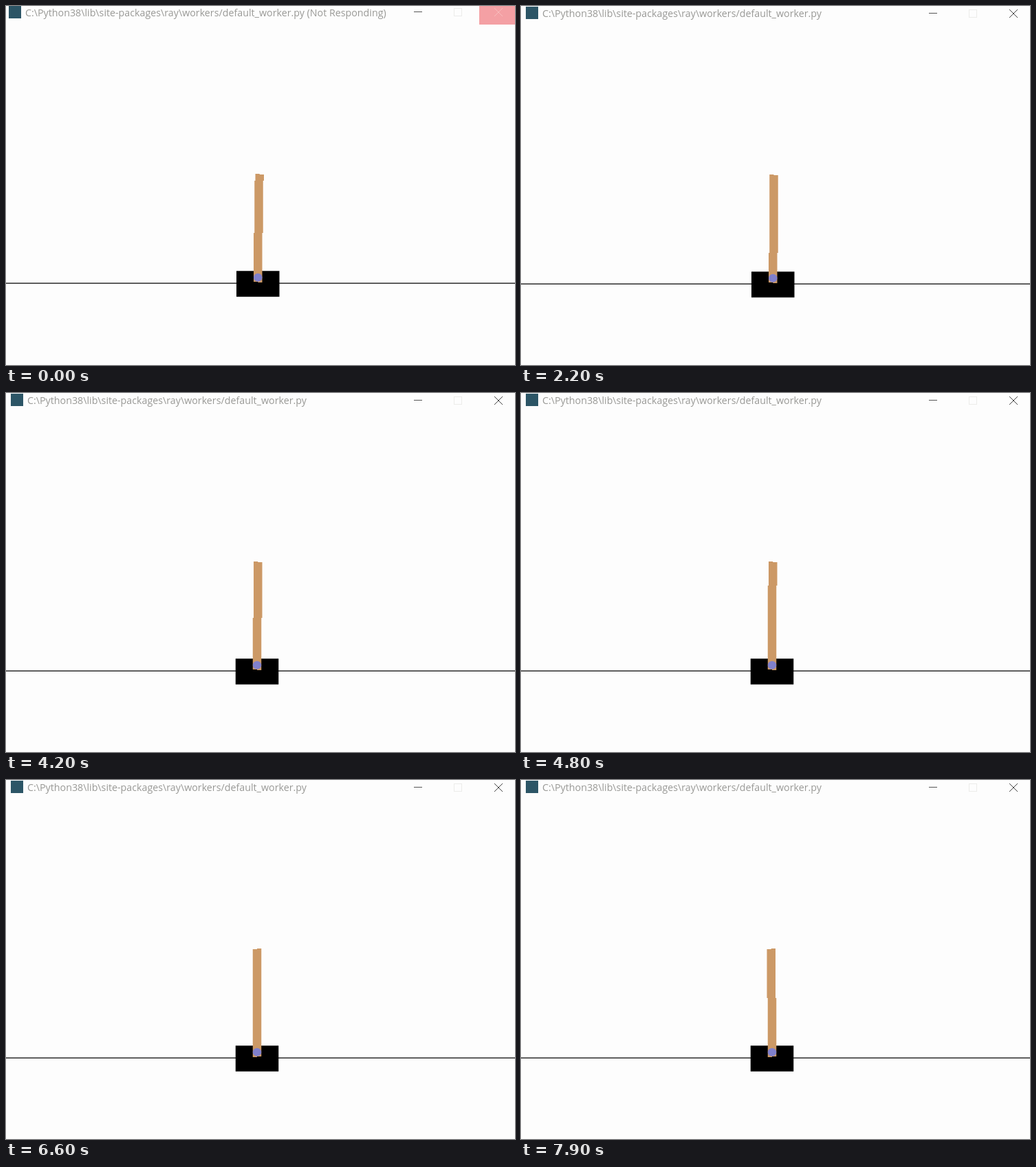
An HTML page with a canvas for the animation above (8 s loop, 740x522 px).

```html
<!DOCTYPE html>
<html lang="en">
<head>
<meta charset="utf-8">
<title>Cart pole</title>
<style>
  html, body { margin: 0; width: 100%; height: 100%; overflow: hidden; background: #fdfdfd; }
  canvas { display: block; }
</style>
</head>
<body>
<canvas id="stage" width="740" height="522"></canvas>
<script>
const ctx = document.getElementById('stage').getContext('2d');
const LOOP = 8000, STEP = 100, WAKE = 800;
const ORIGIN = 360, CELL = 1.25; // the scene is pixel art scaled up by CELL
const TITLE = 'C:\\Python38\\lib\\site-packages\\ray\\workers/default_worker.py';

// time, left edge of the pole at the axle in cells from ORIGIN, lean in cells per row
const KEYS = [
  [800, 1.15, 0.0132],
  [1300, 1.33, 0.010],
  [3000, 0.166, 0.006],
  [4200, -0.483, 0.007],
  [4800, -0.58, 0.005],
  [6600, -0.5, -0.003],
  [7900, -0.454, -0.007]
];

function pose(t) {
  if (t < WAKE) return { x: 0.145, lean: 1 / 76 };
  let i = 0;
  while (i < KEYS.length - 2 && t >= KEYS[i + 1][0]) i++;
  const [t0, x0, l0] = KEYS[i], [t1, x1, l1] = KEYS[i + 1];
  const k = Math.min(1, (t - t0) / (t1 - t0));
  return { x: x0 + (x1 - x0) * k, lean: l0 + (l1 - l0) * k };
}

const snap = x => ORIGIN + CELL * Math.floor(x);

function rect(x, y, w, h, color) {
  ctx.fillStyle = color;
  ctx.fillRect(x, y, w, h);
}

function cross(x, y, size, color) {
  ctx.strokeStyle = color;
  ctx.lineWidth = 1;
  ctx.beginPath();
  ctx.moveTo(x, y);
  ctx.lineTo(x + size, y + size);
  ctx.moveTo(x + size, y);
  ctx.lineTo(x, y + size);
  ctx.stroke();
}

function drawTitleBar(frozen) {
  const dx = frozen ? -3 : 0, dy = frozen ? -1 : 0;
  rect(7 + dx, 1 + dy, 18, 18, '#2c5566');
  ctx.font = '14.25px "Open Sans", "Noto Sans", sans-serif';
  ctx.fillStyle = '#999996';
  ctx.fillText(TITLE + (frozen ? ' (Not Responding)' : ''), 31 + dx, 16 + dy);

  rect(593, frozen ? 8 : 10, 12, 1, '#555');
  ctx.strokeStyle = '#ececea';
  ctx.lineWidth = 1;
  ctx.strokeRect(651.5, frozen ? 3.5 : 5.5, 11, 11);
  if (frozen) rect(688, 0, 52, 27, '#f4a0a4');
  cross(710, frozen ? 3 : 5, 12, frozen ? '#f8bcbc' : '#444');
}

// Each row snaps to a cell, which gives the pole its stepped edges.
function drawPole(x, lean, dy) {
  const half = 5 * CELL;
  for (let y = 245; y <= 402; y++) {
    const topRow = y === 245, endRow = topRow || y === 402;
    const onRight = endRow && topRow === (lean < 0);
    const px = snap(x + lean * (395 - y)) + (onRight ? half : 0);
    rect(px, y + dy, endRow ? half : 2 * half, 1, '#cc9966');
  }
}

function drawAxle(x, y) {
  ctx.fillStyle = '#8080cc';
  ctx.beginPath();
  ctx.ellipse(x + 6.25, y, 6.25, 6, 0, 0, Math.PI * 2);
  ctx.fill();
}

function draw(t) {
  const frozen = t < WAKE, dy = frozen ? -1 : 0;
  const { x, lean } = pose(t);
  const base = snap(x);
  rect(0, 0, 740, 522, '#fdfdfd');
  drawTitleBar(frozen);
  rect(0, 403.5 + dy, 740, CELL, '#000');
  rect(base - 25, 386.25 + dy, 50 * CELL, 30 * CELL, '#000');
  drawPole(x, lean, dy);
  drawAxle(base, 395.8 + dy);
}

const start = performance.now();
function tick() {
  const t = (performance.now() - start) % LOOP;
  draw(Math.floor(t / STEP) * STEP);
  requestAnimationFrame(tick);
}
tick();
</script>
</body>
</html>
```
